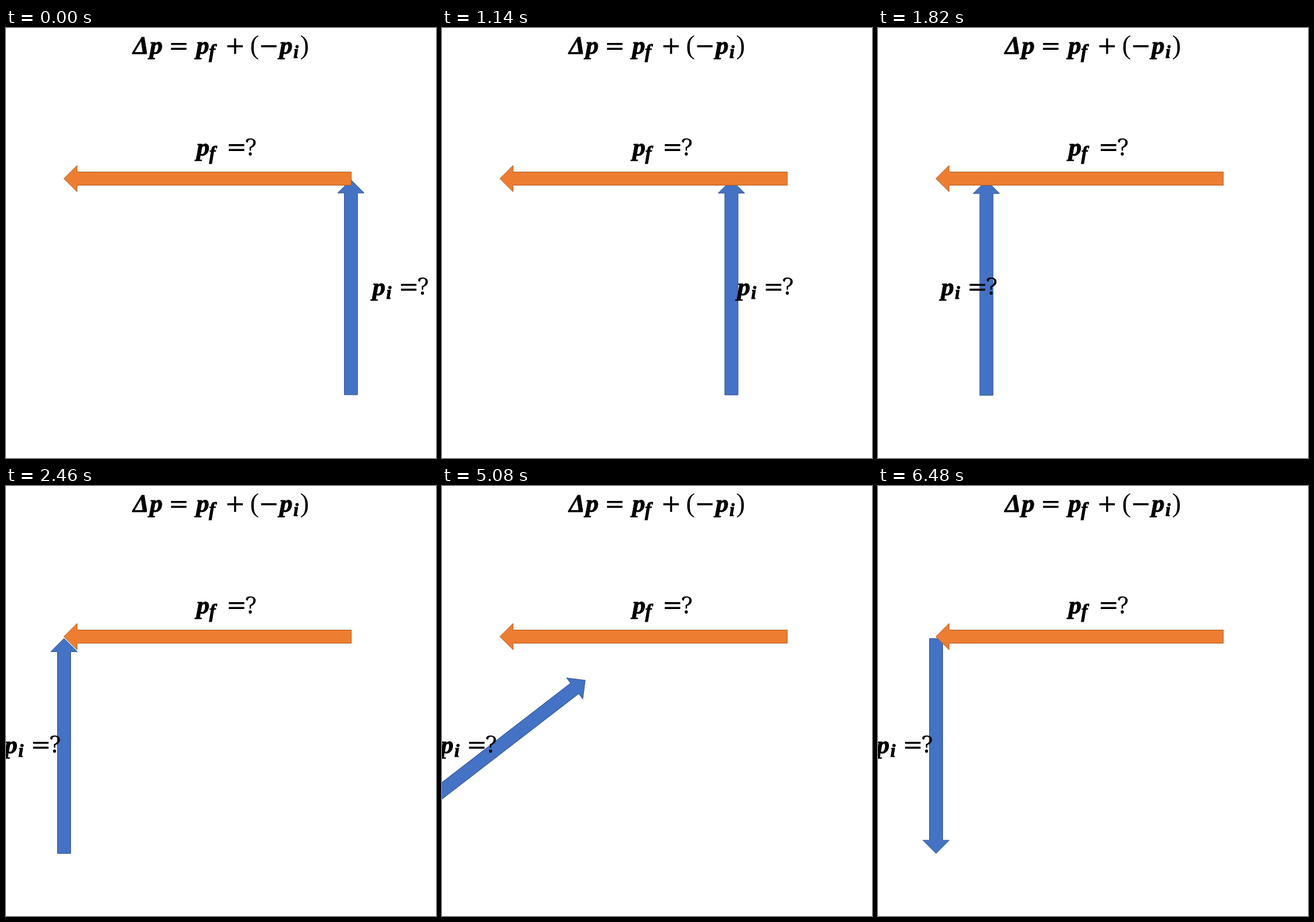
These frames come from a looping animation (748x748 px, 8000 ms). An HTML page with a canvas:

```html
<!DOCTYPE html>
<html lang="en">
<head>
<meta charset="utf-8">
<title>Momentum vectors</title>
<style>
  html, body { margin: 0; width: 100%; height: 100%; overflow: hidden; background: #fff; }
  canvas { display: block; }
</style>
</head>
<body>
<canvas id="stage" width="748" height="748"></canvas>
<script>
const ctx = document.getElementById('stage').getContext('2d');
const LOOP = 8000, STEP = 40, STEPS = 50;
const SLIDE_START = 500, SPIN_START = 4520;

const ITALIC = '"Liberation Serif", serif';
const UPRIGHT = '"Noto Serif", serif';
const SIGNS = '"DejaVu Sans", sans-serif';

// Stepped progress of a two-second effect; the first step is barely under way.
function progress(time, start) {
  if (time < start) return 0;
  const n = Math.min(STEPS, Math.floor((time - start) / STEP) + 1);
  return Math.min(1, (n - 0.8) / 48.8);
}

const smooth = t => t - Math.sin(2 * Math.PI * t) / (2 * Math.PI);

// Arrow pointing up, centred on (x, y), turned clockwise by angle.
function arrow(x, y, length, angle, fill, line) {
  const h = length / 2, shaft = 11.5, head = 23;
  ctx.save();
  ctx.translate(x, y);
  ctx.rotate(angle);
  ctx.beginPath();
  ctx.moveTo(0, -h);
  ctx.lineTo(head, head - h);
  ctx.lineTo(shaft, head - h);
  ctx.lineTo(shaft, h);
  ctx.lineTo(-shaft, h);
  ctx.lineTo(-shaft, head - h);
  ctx.lineTo(-head, head - h);
  ctx.closePath();
  ctx.fillStyle = fill;
  ctx.fill();
  ctx.strokeStyle = line;
  ctx.lineWidth = 1;
  ctx.stroke();
  ctx.restore();
}

// Places a glyph by the left edge of its ink and returns the pen position.
function glyph(char, x, y, font) {
  ctx.font = font;
  const pen = x + ctx.measureText(char).actualBoundingBoxLeft;
  ctx.fillText(char, pen, y);
  return pen;
}

// Heavy italic: the outline thickens the strokes.
function bold(char, x, y, size) {
  const pen = glyph(char, x, y, `italic bold ${size}px ${ITALIC}`);
  ctx.strokeStyle = '#000';
  ctx.lineWidth = 1;
  ctx.strokeText(char, pen, y);
}

// Places an operator by its left edge and vertical middle.
function sign(char, x, mid) {
  ctx.font = `43px ${SIGNS}`;
  const m = ctx.measureText(char);
  const drop = (m.actualBoundingBoxAscent - m.actualBoundingBoxDescent) / 2;
  ctx.fillText(char, x + m.actualBoundingBoxLeft, mid + drop);
}

function momentum(sub, x, base) {
  bold('p', x, base, 45);
  if (sub === 'f') bold('f', x + 26, base + 7, 33);
  else bold('i', x + 28, base + 6.5, 32);
}

function unknown(sub, x, base, gap) {
  momentum(sub, x, base);
  sign('=', x + gap, base - 14);
  glyph('?', x + gap + 30, base - 0.5, `42px ${UPRIGHT}`);
}

function heading() {
  const paren = `47px ${ITALIC}`;
  bold('Δ', 219, 45, 44);
  bold('p', 246, 45, 45);
  sign('=', 286.5, 32);
  momentum('f', 327, 45);
  sign('+', 384.5, 31.5);
  glyph('(', 426.5, 44.7, paren);
  sign('−', 443, 31);
  momentum('i', 472, 45);
  glyph(')', 512.5, 44.7, paren);
}

function draw(time) {
  const slide = smooth(progress(time, SLIDE_START));
  const spin = progress(time, SPIN_START);

  ctx.fillStyle = '#fff';
  ctx.fillRect(0, 0, 748, 748);
  arrow(600 - 499 * slide, 451 + 1.2 * slide, 374, Math.PI * spin, '#4472c4', '#2f528f');
  arrow(350.7, 262, 500, -Math.PI / 2, '#ed7d31', '#ae5a21');

  ctx.fillStyle = '#000';
  heading();
  unknown('f', 327.5, 222, 59.5);
  unknown('i', 633.5 - 640 * slide, 464.5, 53);
}

const origin = performance.now();
function tick() {
  draw((performance.now() - origin) % LOOP);
  requestAnimationFrame(tick);
}
tick();
</script>
</body>
</html>
```
